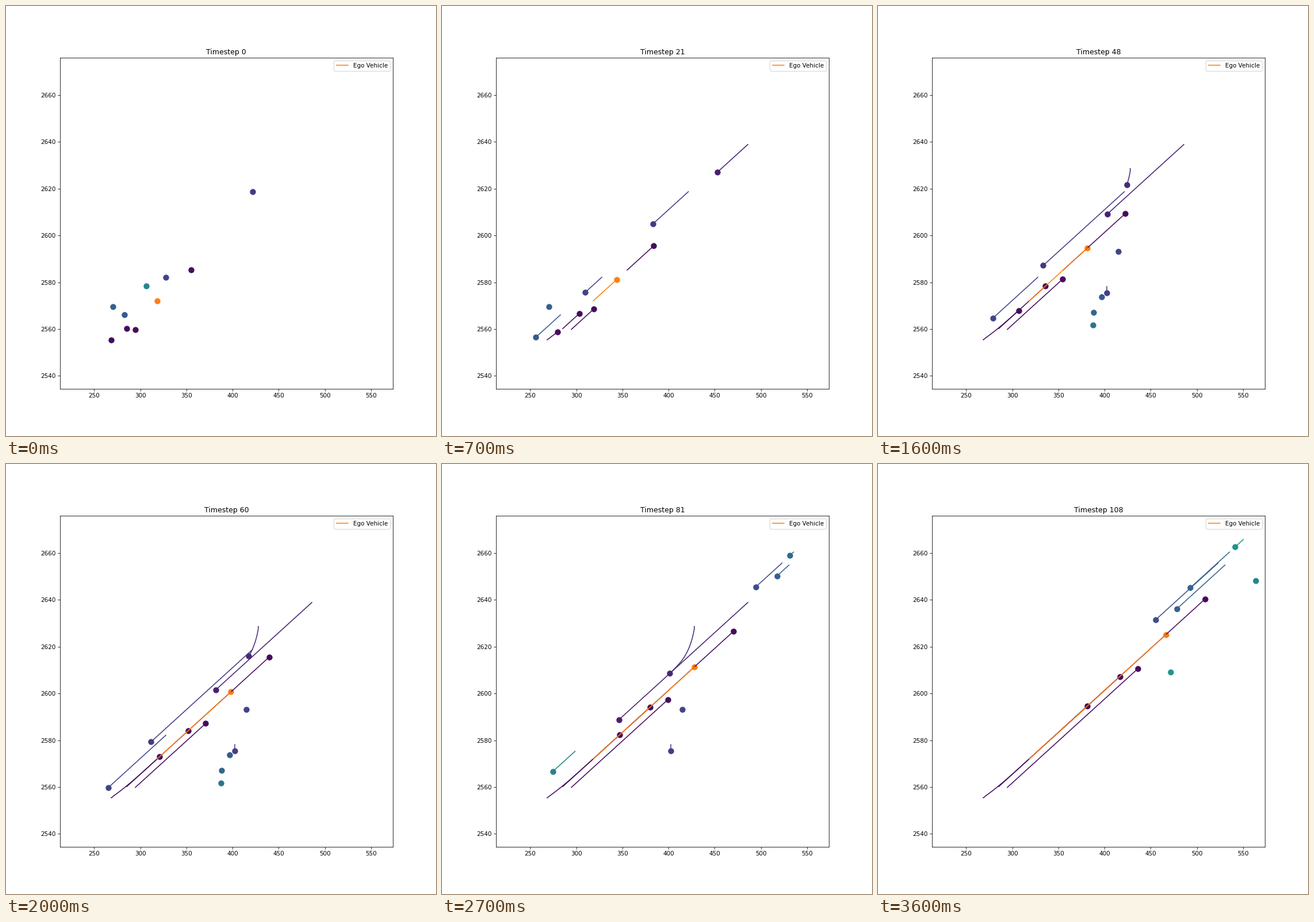
Recreate the animation shown at these times as a matplotlib script. Size 748x748 px, loop 3.7 s.

```python
import numpy as np
import matplotlib.pyplot as plt
from matplotlib.animation import FuncAnimation

SIZE, INCHES = 748, 10
FRAMES, STRIDE = 37, 3
LAST = (FRAMES - 1) * STRIDE
XLIM, YLIM = (212.7, 573.8), (2534.5, 2676.0)
BOX = SIZE * np.array([0.125, 0.12, 0.9, 0.89])  # left, top, right, bottom
EGO = "#ff7f0e"

# Parallel lanes: vertical pixel offsets from the ego vehicle's line
SLOPE, ORIGIN = -0.9093, (263, 513)
MAIN, SIDE, NEAR, FAR = 0, 15, -27.5, -42

fig, ax = plt.subplots(figsize=(INCHES, INCHES), dpi=SIZE / INCHES)
ax.set(xlim=XLIM, ylim=YLIM)
title = ax.set_title("Timestep 0")
cars = []


def shade(life):
    """Long-lived vehicles are purple, brief ones teal."""
    return plt.cm.viridis(0.03 + 0.53 * max(0, 1 - life / LAST) ** 1.4)


def add(px, py, start, end, color=None, label=None):
    """Add a vehicle from its path in stage pixels, one point per timestep."""
    x = np.interp(px, BOX[[0, 2]], XLIM)
    y = np.interp(py, BOX[[1, 3]], YLIM[::-1])
    color = color or shade(end - start)
    line, = ax.plot([], [], color=color, label=label)
    dot = ax.scatter([], [], s=80, color=[color])
    cars.append((start, end, x, y, line, dot))


def drive(x0, lane, speed, start=0, end=LAST, lag=0, merge=0, **style):
    """Follow a lane; lag is the distance lost while reaching full speed."""
    t = np.arange(end - start + 1)
    x = x0 + speed * t - lag * (1 - np.exp(-t / (10 + abs(lag) / 3)))
    y = ORIGIN[1] + SLOPE * (x - ORIGIN[0]) + lane
    add(x, y + merge * np.exp(-(t / 24) ** 2), start, end, **style)


def park(x0, y0, start, end, roll=0):
    """Stand still, after rolling the last few pixels down."""
    t = np.arange(end - start + 1)
    add(x0 + 0 * t, y0 - roll * np.exp(-t / 5), start, end)


# Through traffic
drive(183, MAIN, 2.1, lag=46, merge=-5)
drive(210, MAIN, 2.18, lag=25)
drive(225, SIDE, 2.18, lag=8.5)
drive(322, MAIN, 2.31, lag=2.5)

# Oncoming traffic
drive(428.5, FAR + 2.5, -2.94, end=66)
drive(278, NEAR, -1.9, end=60, lag=-14)
drive(206, NEAR, -2.2, end=45, lag=-4)
drive(532, NEAR, -2.7, 6, 93, lag=22)
drive(438.5, NEAR, -2, 27, 105, lag=-88, merge=-43)
drive(591.5, FAR, -2.3, 61, 115)
drive(231.5, FAR, -3.25, 69, 87)
drive(170.5, NEAR - 2, -3.4, 67, 72)
drive(603.5, NEAR, -2.31, 72, 112)
drive(611.5, FAR - 1, -2.28, 78, 112)
drive(635.5, FAR - 1, -2.4, 102, 108)

# Parked
park(186, 523, 0, 40)
park(243.5, 487, 0, 15)
park(417.5, 427, 27, 87)
park(397.5, 499.5, 27, 90, roll=12)
park(389, 506.5, 33, 78, roll=5)
park(374.5, 532.5, 36, 72)
park(374, 554.5, 33, 60)
park(657, 203, 93, 108)
park(509, 362, 102, 108)

drive(263, MAIN, 2.28, lag=8.7, color=EGO, label="Ego Vehicle")
ax.legend(loc="upper right")


def update(frame):
    now = frame * STRIDE
    title.set_text(f"Timestep {now}")
    for start, end, x, y, line, dot in cars:
        alive = start <= now <= end
        line.set_visible(alive)
        dot.set_visible(alive)
        if alive:
            n = now - start
            line.set_data(x[:n + 1], y[:n + 1])
            dot.set_offsets([(x[n], y[n])])


anim = FuncAnimation(fig, update, frames=FRAMES, init_func=lambda: update(0),
                     interval=100, repeat=True, repeat_delay=0)
plt.show()
```
